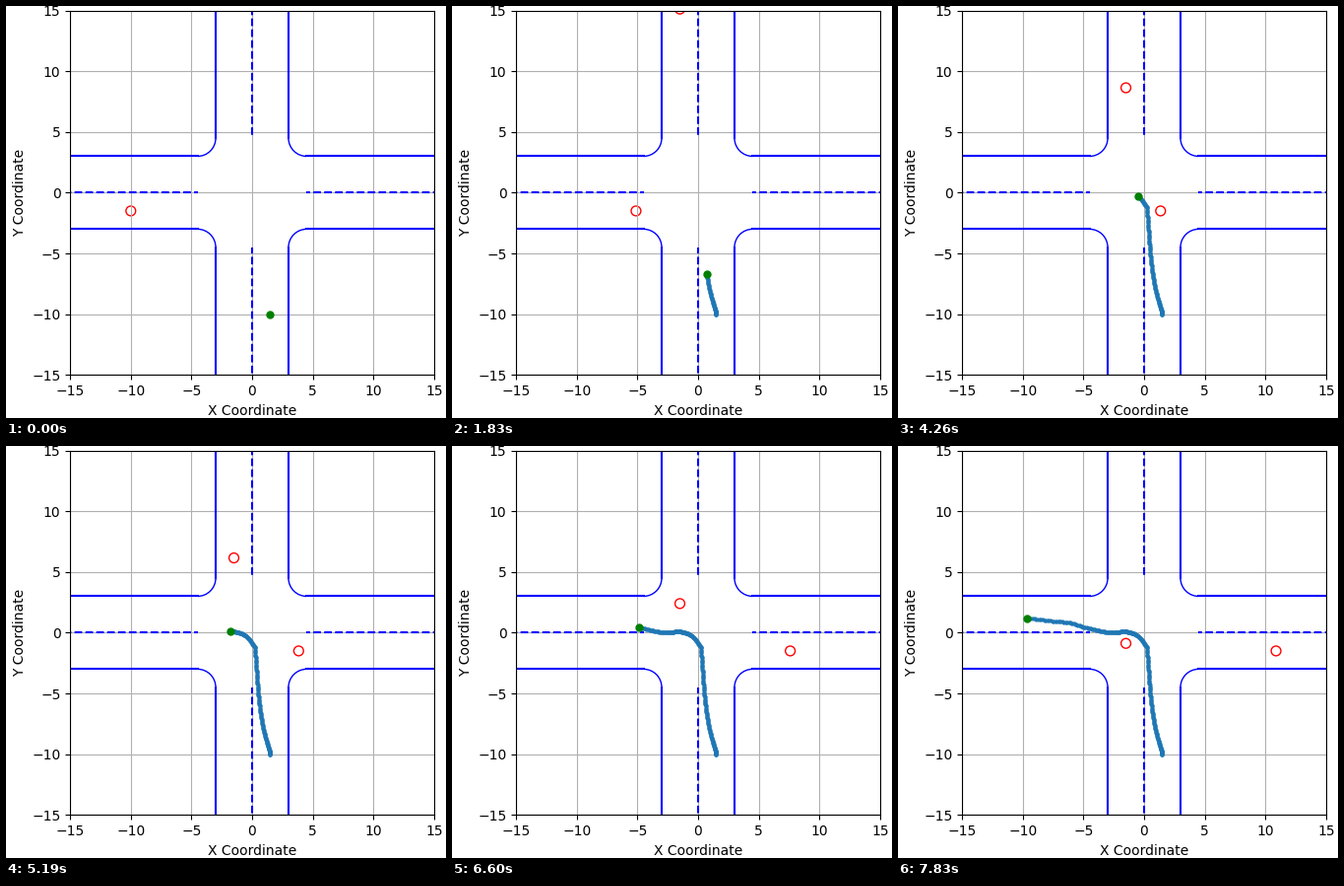
Write a matplotlib script that moves like this. It is 447 px wide and 418 px high and loops after 7.86 s.

```python
import numpy as np
import matplotlib.pyplot as plt
from matplotlib.animation import FuncAnimation
from matplotlib.patches import Arc, Circle

W, H, DPI = 447, 418, 100
FRAMES, INTERVAL = 262, 30
STEP = 0.08      # distance the other vehicles cover per frame
LANE = 3.0       # half width of the road
CORNER = 1.5     # radius of the rounded kerbs
EDGE = LANE + CORNER
LIMIT = 15
ROAD_LW = 1.5

TURN = 118       # frame at which the car swings left
TURN_X, TURN_Y = 0.24, -1.2
END_X = -9.63

# Path of the car after the swing: x, y
BEND = np.array([
    (TURN_X, TURN_Y), (-0.45, -0.33), (-1.0, -0.02), (-1.7, 0.10), (-2.3, 0.03),
    (-4.83, 0.43), (-6.2, 0.83), (-7.2, 0.92), (END_X, 1.21),
])


def hermite(t, knots, values):
    """Smooth cubic curve through the given knots."""
    slope = np.gradient(values, knots)
    i = np.clip(np.searchsorted(knots, t, side="right") - 1, 0, len(knots) - 2)
    h = knots[i + 1] - knots[i]
    s = (t - knots[i]) / h
    return (values[i] * (1 + 2 * s) * (1 - s) ** 2
            + values[i + 1] * s * s * (3 - 2 * s)
            + h * slope[i] * s * (1 - s) ** 2
            + h * slope[i + 1] * s * s * (s - 1))


def approach(t):
    """Pull away towards a steady speed while drifting to the centre line."""
    lag = 38.5
    d = 0.1085 * (t - lag * (1 - np.exp(-t / lag)))
    x = 0.8 - 0.064 * d + 0.7 * np.exp(-(d / 2.1) ** 1.3)
    return x, d - 10


def leave(t):
    """Creep through the bend, then speed up."""
    u = (t - TURN) / (FRAMES - 1 - TURN)
    x = TURN_X + (END_X - TURN_X) * (0.45 * u + 0.55 * u ** 3.1)
    return x, hermite(-x, -BEND[:, 0], BEND[:, 1])


def dashed(xs, ys, run):
    """Dashed line whose pattern began `run` pixels before its first point."""
    offset = run / (ROAD_LW * DPI / 72)
    ax.plot(xs, ys, color="b", lw=ROAD_LW, ls=(offset, (3.7, 1.6)))


def draw_roads():
    for sx in (-1, 1):
        for sy in (-1, 1):
            ax.plot([sx * LIMIT, sx * EDGE], [sy * LANE] * 2, "b-", lw=ROAD_LW)
            ax.plot([sx * LANE] * 2, [sy * EDGE, sy * LIMIT], "b-", lw=ROAD_LW)
            start = 135 - 45 * sy + 90 * (sx * sy > 0) if sy > 0 else 45 + 45 * sx
            if sy > 0:
                start = 225 - 45 * sx
            ax.add_patch(Arc((sx * EDGE, sy * EDGE), 2 * CORNER, 2 * CORNER,
                             theta1=start, theta2=start + 90, color="b", lw=1))
        dashed([sx * LIMIT, sx * EDGE], [0, 0], 61.6)
    dashed([0, 0], [LIMIT, EDGE], 58.6)
    dashed([0, 0], [-LIMIT, -EDGE], 53.8)


fig = plt.figure(figsize=(W / DPI, H / DPI), dpi=DPI)
ax = fig.add_axes([65.2 / W, 43.77 / H, 369.6 / W, 369.6 / H])
ax.set(xlim=(-LIMIT, LIMIT), ylim=(-LIMIT, LIMIT),
       xlabel="X Coordinate", ylabel="Y Coordinate")
ax.set_xticks(range(-15, 16, 5))
ax.set_yticks(range(-15, 16, 5))
ax.grid(True)
draw_roads()

steps = np.arange(FRAMES)
car_x, car_y = np.hstack([approach(steps[:TURN]), leave(steps[TURN:])])

trail, = ax.plot([], [], ".", color="C0", ms=4)
car, = ax.plot([], [], "o", color="g", ms=5, zorder=3)
eastbound, southbound = (
    ax.add_patch(Circle((0, 0), 0.4, fill=False, ec="r", lw=1)) for _ in range(2))


def update(i):
    trail.set_data(car_x[:i], car_y[:i])
    car.set_data([car_x[i]], [car_y[i]])
    eastbound.center = (-10 + STEP * i, -1.5)
    southbound.center = (-1.5, 20 - STEP * i)
    return trail, car, eastbound, southbound


anim = FuncAnimation(fig, update, frames=FRAMES, interval=INTERVAL,
                     repeat=True, repeat_delay=0, blit=False)
plt.show()
```
